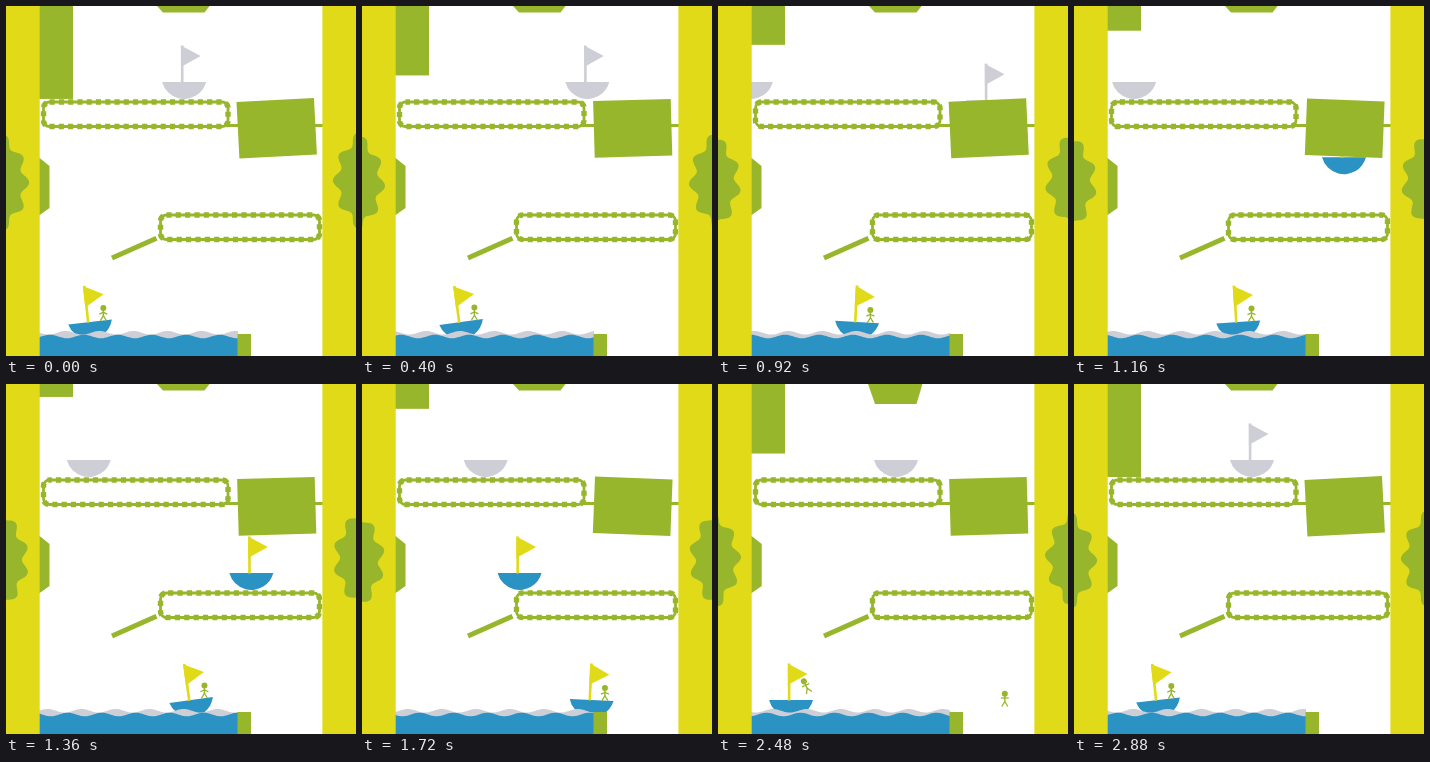
Recreate the animation shown at these times as an HTML page with a canvas. Size 350 by 350 pixels, loop 2.92 s.

```html
<!DOCTYPE html>
<html>
<head>
<meta charset="utf-8">
<title>Boat factory</title>
<style>
html, body { margin: 0; width: 100%; height: 100%; overflow: hidden; background: #fff; }
canvas { display: block; width: 350px; height: 350px; }
</style>
</head>
<body>
<canvas width="350" height="350"></canvas>
<script>
const ctx = document.querySelector('canvas').getContext('2d');
const GREEN = '#98b62b', YELLOW = '#e0da18', BLUE = '#2b92c4', GRAY = '#cdced6';
const LOOP = 2920, CYCLE = 2880, TAU = Math.PI * 2, RAD = Math.PI / 180;

const unit = (t, a, b) => Math.min(1, Math.max(0, (t - a) / (b - a)));
const fall = (t, a, b) => unit(t, a, b) ** 2;
const pulse = (t, a, peak, b) => unit(t, a, peak) - unit(t, peak, b);

function poly(color, ...p) {
  ctx.fillStyle = color;
  ctx.beginPath();
  for (let i = 0; i < p.length; i += 2) ctx.lineTo(p[i], p[i + 1]);
  ctx.fill();
}

function rect(color, x, y, w, h) {
  ctx.fillStyle = color;
  ctx.fillRect(x, y, w, h);
}

function line(width, ...p) {
  ctx.strokeStyle = GREEN;
  ctx.lineWidth = width;
  ctx.beginPath();
  for (let i = 0; i < p.length; i += 2) ctx.lineTo(p[i], p[i + 1]);
  ctx.stroke();
}

function placed(x, y, degrees, draw) {
  ctx.save();
  ctx.translate(x, y);
  ctx.rotate(degrees * RAD);
  draw();
  ctx.restore();
}

function hull(color) {
  const r = 22.7, a = Math.asin(5.7 / r);
  ctx.fillStyle = color;
  ctx.beginPath();
  ctx.arc(0, -5.7, r, a, Math.PI - a);
  ctx.fill();
}

function sail(color) {
  rect(color, -3.2, -36.5, 2.6, 37);
  poly(color, -3.2, -36.5, 16.5, -26, -3.2, -15);
}

// x, y is the centre of the head
function person(x, y, lean, armLift) {
  placed(x, y, lean, () => {
    ctx.fillStyle = GREEN;
    ctx.beginPath();
    ctx.arc(0, 0, 3, 0, TAU);
    ctx.fill();
    line(1.4, 0, 2, 0, 7.7);
    line(1.3, -3, 12.7, 0, 7.7, 3, 12.7);
    line(1.3, -4, 6.2 - armLift, 0, 4.4, 4, 6.2 - armLift);
  });
}

// Eases from drifting to full speed while afloat
function sailedX(age) {
  const keys = [[2480, 73], [2880, 84], [3280, 99], [3800, 139], [4240, 185], [4960, 274]];
  return keys.slice(1).reduce((x, [t, to], i) =>
    x + (to - keys[i][1]) * unit(age, keys[i][0], t), keys[0][1]);
}

function boatX(age) {
  if (age > 2300) return sailedX(age) - 3 * (1 - unit(age, 2300, 2480));
  return 178 + 0.1135 * Math.min(0, age + 680)
    + 92 * unit(age, 0, 780) - 200 * unit(age, 1260, 2080);
}

// Slides down the ramp, then rocks with the distance sailed
function boatTilt(age, x) {
  const afloat = unit(age, 2480, 2700) - unit(age, 4700, 4960);
  return afloat * (-2.4 + 5.4 * Math.cos(TAU * (x - 139) / 88))
    - 20 * pulse(age, 1760, 1880, 2080);
}

// One boat's whole life, from bare hull to its drop past the dock
function boat(age) {
  const x = boatX(age), tilt = boatTilt(age, x);
  const y = 76 + 57 * fall(age, 780, 1030) + 56 * fall(age, 1030, 1260)
    + 47 * unit(age, 1760, 1930) + 80 * fall(age, 1930, 2300) - 2 * unit(age, 4700, 4960);
  const painted = age > 1030;

  placed(x, y + 110 * fall(age, 5110, 5400), tilt, () => {
    hull(painted ? BLUE : GRAY);
    if (age > -380) {
      ctx.translate(0, -60 * (1 - fall(age, -380, -130)));
      sail(painted ? YELLOW : GRAY);
    }
  });

  if (age > 2120 && age < 2490) {
    const k = unit(age, 2120, 2490);
    person(40 + 47 * k, 178 + 125.3 * k * k, -25, 2);
  } else if (age >= 2490) {
    const drop = fall(age, 5120, 5740);
    person(x + 13.3 - 0.5 * unit(age, 5120, 5360),
      y - 12.7 + 13 * Math.sin(tilt * RAD) + 56 * drop, 0, drop ? 2 : 0);
  }
}

function belt(x, y, w, h, beads, shift) {
  const r = 6, pitch = (2 * (w + h) - 8 * r + TAU * r) / beads;
  ctx.strokeStyle = GREEN;
  ctx.beginPath();
  ctx.roundRect(x, y, w, h, r);
  ctx.lineWidth = 2.8;
  ctx.stroke();
  ctx.setLineDash([pitch * 0.55, pitch * 0.45]);
  ctx.lineDashOffset = -shift * pitch;
  ctx.lineWidth = 5.4;
  ctx.stroke();
  ctx.setLineDash([]);
}

function gear(x, y, turn) {
  ctx.fillStyle = GREEN;
  ctx.beginPath();
  for (let a = 0; a < 360; a++) {
    const r = 56 + 3.6 * Math.cos(14 * a * RAD), b = a * RAD + turn;
    ctx.lineTo(x + r * Math.cos(b), y + r * Math.sin(b));
  }
  ctx.fill();
}

function wave(color, level, phase) {
  ctx.fillStyle = color;
  ctx.beginPath();
  ctx.moveTo(33, 350);
  for (let x = 33; x <= 232; x++) {
    ctx.lineTo(x, level + 1.8 * Math.sin(TAU * (x / 34 - phase)));
  }
  ctx.lineTo(232, 350);
  ctx.fill();
}

function render(t) {
  const p = t / CYCLE;
  rect('#fff', 0, 0, 350, 350);

  belt(37.5, 96, 184.5, 24.5, 44, 27 * unit(t, 0, 2200));
  belt(154.5, 209, 159, 24.5, 38, -61 * p);
  line(3, 218, 119.5, 317, 119.5);
  line(5, 106, 252, 150.5, 232.2);

  for (const k of [1, 0, -1]) boat(t + k * CYCLE);

  // Water and dock
  wave(GRAY, 326.8, p);
  wave(BLUE, 330.5, 0.54 - p);
  rect(GREEN, 231.5, 328, 13.5, 22);

  // Rattling paint box
  placed(270.7, 122.3, -0.2 - 2.8 * Math.cos(6 * TAU * p),
    () => rect(GREEN, -38.8, -28.3, 77.6, 56.6));

  // Piston and the two ejectors
  rect(GREEN, 33, 0, 34, 93 - 84.7 * (1 - Math.abs(1 - 2 * p)));
  const down = pulse(t, 1990, 2520, 2860), tipY = 6.6 + 14.5 * down;
  poly(GREEN, 151 - down, 0, 157, tipY, 198.5, tipY, 203.5 + down, 0);
  const tipX = 43.5 + 4.5 * pulse(t, 1940, 2120, 2500);
  poly(GREEN, 33, 151.5, tipX, 160, tipX, 202, 33, 209.5);

  rect(YELLOW, 0, 0, 33.7, 350);
  rect(YELLOW, 316.4, 0, 33.6, 350);
  const turn = p * TAU / 14;
  gear(-36.5, 176.5, turn);
  gear(386.5, 174.5, Math.PI - turn);
}

const start = performance.now();
function tick() {
  render(Math.min((performance.now() - start) % LOOP, CYCLE));
  requestAnimationFrame(tick);
}
tick();
</script>
</body>
</html>
```
